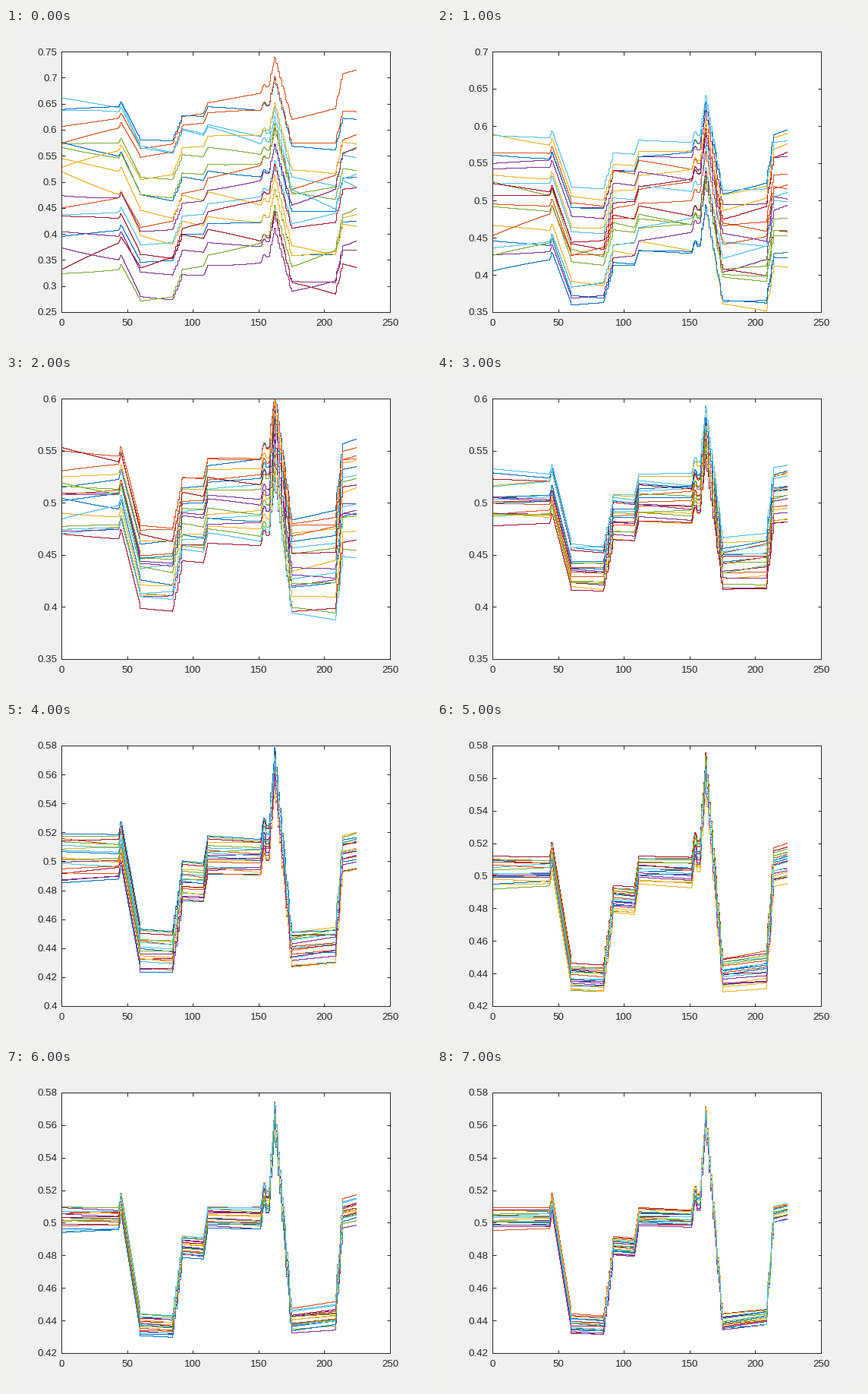
A matplotlib script for the animation above (8000 ms loop, 560 px wide and 420 px high).

```python
import numpy as np
import matplotlib.pyplot as plt
from matplotlib.animation import FuncAnimation

W, H, DPI = 560, 420, 100
PX = 72 / DPI  # points per pixel
LEFT, BOTTOM, AX_W, AX_H = 73, 46, 433, 343
COLORS = ["#0072bd", "#d95319", "#edb120", "#7e2f8e",
          "#77ac30", "#4dbeee", "#a2142f"]
INK = "#262626"
N_LINES = 20
X_END = 224

# Axis limits of each step
LIMITS = [(.25, .75), (.35, .70), (.35, .60), (.35, .60),
          (.40, .58), (.42, .58), (.42, .58), (.42, .58)]

# Shared profile that every curve settles towards
KNOT_X = [0, 43, 45, 60, 84, 89, 92, 107.5, 111, 151,
          154, 156, 157.5, 162, 175, 208, 214, X_END]
KNOT_Y = [.503, .503, .512, .438, .437, .465, .486, .485, .504, .503,
          .518, .513, .513, .567, .440, .443, .506, .508]

# One sample per pixel column, plus the knots
X = np.union1d(np.arange(0, X_END, 250 / AX_W), KNOT_X)
BASE = np.interp(X, KNOT_X, KNOT_Y)
T = 2 * X / X_END - 1

plt.rcParams["font.family"] = "Liberation Sans"


def curves(step):
    """The profile plus one parabola per line; their spread halves each step."""
    rng = np.random.default_rng(step)
    even = np.linspace(-1, 1, N_LINES)
    level, trend, bend = (rng.permutation(even)[:, None] for _ in range(3))
    reach = .21 * .5 ** step + .006
    return BASE + reach * (.7 * level + .35 * trend * T
                           + .2 * bend * (T ** 2 - 1 / 3))


fig = plt.figure(figsize=(W / DPI, H / DPI), dpi=DPI, facecolor="#f0f0f0")
ax = fig.add_axes([LEFT / W, BOTTOM / H, AX_W / W, AX_H / H])
ax.set_xlim(0, 250)
ax.set_xticks(range(0, 251, 50))
ax.tick_params(direction="in", top=True, right=True, length=4.5 * PX,
               width=PX, color=INK, labelcolor=INK, labelsize=13.33 * PX)
ax.tick_params(axis="x", pad=9 * PX)
ax.tick_params(axis="y", pad=5.5 * PX)
for spine in ax.spines.values():
    spine.set(color=INK, linewidth=PX)

# Snapped steps keep the lines one hard-edged pixel wide
lines = [ax.plot(X, BASE, color=COLORS[i % len(COLORS)], lw=PX, snap=True,
                 drawstyle="steps-mid", solid_joinstyle="miter")[0]
         for i in range(N_LINES)]


def draw(step):
    low, high = LIMITS[step]
    gap = .05 if high - low > .2 else .02
    ticks = low + gap * np.arange(round((high - low) / gap) + 1)
    ax.set_yticks(ticks, [f"{t:.3g}" for t in ticks])
    ax.set_ylim(low, high)
    for line, y in zip(lines, curves(step)):
        line.set_ydata(y)
    return lines


anim = FuncAnimation(fig, draw, frames=len(LIMITS), interval=1000,
                     init_func=lambda: draw(0), repeat=True, repeat_delay=0)
plt.show()
```
